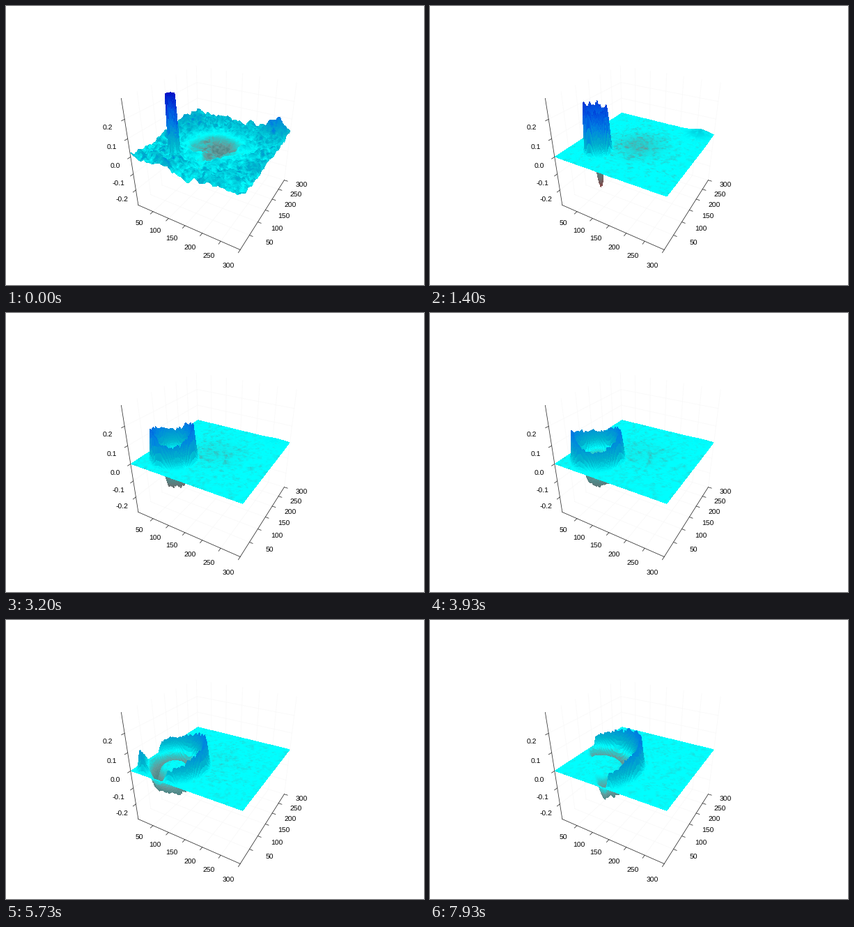
Animation of 600 by 400 pixels, one loop 8 s. Source, as a matplotlib script:

```python
import numpy as np
import matplotlib.pyplot as plt
from matplotlib.animation import FuncAnimation
from matplotlib.collections import QuadMesh
from matplotlib.colors import LinearSegmentedColormap, Normalize

W, H, DPI = 600, 400, 100
FRAMES, LOOP = 120, 8000
CELLS = 160
INSET = 0.0025   # keeps the hard-edged cells inside the plane's outline
SRC = 0.25       # wave centre, same on both axes
ZMAX = 0.3
FACING = 0.63    # direction in the plane that points right on screen

plt.rcParams["font.family"] = "Liberation Sans"
plt.rcParams["text.hinting"] = "none"
fig = plt.figure(figsize=(W / DPI, H / DPI), dpi=DPI, facecolor="white")
ax = fig.add_axes([0, 0, 1, 1])
ax.axis("off")


# ---- camera, fitted to box corners: (u, v, z) -> (x, y) ----
CORNERS = [
    ((0, 0, 0), (178.3, 216)), ((1, 0, 0), (341, 273)),
    ((1, 1, 0), (407.3, 186)), ((0, 1, 0), (275.5, 153.3)),
    ((0, 0, 1), (165.3, 133)), ((0, 0, -1), (190.4, 285.6)),
    ((1, 0, -1), (335.3, 349.8)), ((1, 1, -1), (399.5, 249.7)),
]


def fit_camera():
    rows, rhs = [], []
    for (u, v, z), (x, y) in CORNERS:
        rows.append([u, v, z, 1, 0, 0, 0, 0, -x * u, -x * v, -x * z])
        rows.append([0, 0, 0, 0, u, v, z, 1, -y * u, -y * v, -y * z])
        rhs += [x, y]
    return np.linalg.lstsq(np.array(rows, float), np.array(rhs, float), rcond=None)[0]


CAM = fit_camera()


def project(u, v, z):
    z = z / ZMAX
    depth = CAM[8] * u + CAM[9] * v + CAM[10] * z + 1
    x = (CAM[0] * u + CAM[1] * v + CAM[2] * z + CAM[3]) / depth
    y = (CAM[4] * u + CAM[5] * v + CAM[6] * z + CAM[7]) / depth
    return np.stack([x, y], axis=-1)


# ---- axes ----
def segment(a, b, color, width):
    ax.plot(*np.array([a, b]).T, color=color, lw=width * 72 / DPI, zorder=1)


def tick(at, toward, text, dx, dy):
    p = project(*at)
    d = project(*toward) - p
    segment(p, p + 5 * d / np.hypot(*d), "#333333", 0.8)
    ax.text(p[0] + dx, p[1] + dy, text, fontsize=7.5, color="black",
            ha="center", va="center_baseline")


def draw_axes():
    steps = np.arange(1, 7) / 6
    levels = np.arange(-2, 3) / 10
    grid = []
    for s in steps:
        grid += [((s, 0, -ZMAX), (s, 1, -ZMAX)), ((0, s, -ZMAX), (1, s, -ZMAX)),
                 ((0, s, -ZMAX), (0, s, ZMAX)), ((s, 1, -ZMAX), (s, 1, ZMAX))]
    for z in levels:
        grid += [((0, 0, z), (0, 1, z)), ((0, 1, z), (1, 1, z))]
    for a, b in grid:
        segment(project(*a), project(*b), "#f9f9f9", 0.8)

    path = [(0, 0, ZMAX), (0, 0, -ZMAX), (1, 0, -ZMAX), (1, 1, -ZMAX)]
    for a, b in zip(path, path[1:]):
        segment(project(*a), project(*b), "#333333", 0.8)

    for s in steps:
        label = f"{300 * s:.0f}"
        tick((s, 0, -ZMAX), (s, -0.05, -ZMAX), label, -20.5 + 4 * s, 15.5 + 7 * s)
        tick((1, s, -ZMAX), (1.05, s, -ZMAX), label, 29.5 - 5 * s, 11.5 - 4.5 * s)
    for z in levels:
        tick((0, 0, z), (0, -0.05, z), f"{z:.1f}", -22 - 10 * z, 12.8 - 5 * z)


# ---- surface grid, finer around the wave centre, ordered back to front ----
fine = np.linspace(INSET, 1 - INSET, 2000)
density = np.cumsum(1 + 3 * np.exp(-((fine - SRC) / 0.07) ** 2))
density = (density - density[0]) / (density[-1] - density[0])
knots = np.interp(np.linspace(0, 1, CELLS + 1), density, fine)
V, U = np.meshgrid(knots[::-1], knots, indexing="ij")

rng = np.random.default_rng(11)


def fractal(power, low, size=256):
    k = np.fft.fftfreq(size, 1 / size)
    freq = np.hypot(k[:, None], k[None, :])
    spectrum = np.fft.fft2(rng.standard_normal((size, size)))
    field = np.fft.ifft2(spectrum * (freq ** 2 + low ** 2) ** (-power / 2)).real
    field = (field - field.mean()) / field.std()
    return field[(V * (size - 1)).astype(int), (U * (size - 1)).astype(int)]


def mound(u, v, radius):
    return np.exp(-((U - u) ** 2 + (V - v) ** 2) / radius ** 2)


def smooth(x):
    x = np.clip(x, 0, 1)
    return x * x * (3 - 2 * x)


ROUGH = fractal(2.6, 9)
GRAIN = fractal(2.4, 18)
RAGGED = fractal(2.2, 24)
PATCH_A = fractal(1.4, 14)
PATCH_B = fractal(1.4, 14)
CENTRE = mound(0.5, 0.5, 0.22)
BUMP = mound(0.88, 0.94, 0.095)
TERRAIN = (0.009 * ROUGH - 0.045 * CENTRE + 0.03 * mound(0.05, 0.75, 0.22)
           - 0.02 * mound(0.55, 0, 0.15) + 0.012 * mound(0.6, 1, 0.25) + 0.008)
BLOTCH = 0.032 * np.abs(GRAIN) * (1 - 2.4 * CENTRE)
BORDER = smooth(U / 0.03) * smooth(V / 0.03)


def ring(u, v, t):
    r = np.hypot(u - SRC, v - SRC)
    a = np.arctan2(v - SRC, u - SRC) - FACING
    front = 0.035 + 0.0405 * t
    opened = smooth((t - 0.3) / 0.8)

    outer = 0.009 + 0.013 * min(t / 3, 1)
    crest = np.exp(-((r - front) / np.where(r > front, outer, 0.045)) ** 2)
    crest = np.where(r > front, crest, 1 + opened * (crest - 1))
    lobes = (1 + 0.2 * smooth((t - 1) / 2) * np.cos(2 * a)
             + 0.5 * smooth((t - 4) / 3) * np.cos(a))
    top = 0.08 + 0.22 * np.exp(-(t / 2.6) ** 1.5)

    dip = opened * (0.08 + 0.3 * np.exp(-t / 2))
    trough = np.exp(-((r - max(front - 0.1, 0)) / 0.045) ** 2)
    return top * lobes * crest - dip * trough


def surface(t):
    # mirrored copies are the waves thrown back by the two near edges
    wave = ring(U, V, t) - ring(-U, V, t) - ring(U, -V, t) + ring(-U, -V, t)
    wave = wave * (1 + 0.07 * smooth((t - 0.3) / 1.5) * RAGGED)
    # the near corner calms down once the ring has left it
    behind = 1 - smooth((U + V - 0.26 - 0.08 * (t - 6)) / 0.14)
    wave = wave * BORDER * (1 - behind * smooth((t - 5.7) / 0.8))

    calm = np.exp(-(wave / 0.03) ** 2)
    fade = np.exp(-t / 0.45)
    z = wave + (TERRAIN * fade + 0.08 * BUMP * np.exp(-t / 1.3)) * calm

    patch = np.clip(PATCH_A * np.cos(0.9 * t) + PATCH_B * np.sin(0.9 * t), 0, None)
    amount = 0.005 + 0.02 * (0.2 + CENTRE) * np.exp(-t / 2.5)
    tint = (amount * patch + 0.028 * CENTRE * np.exp(-t / 2.5)) * (1 - np.exp(-t / 0.5))
    return z, z + (BLOTCH * fade - tint) * calm


STOPS = [
    (-0.30, "#8c1c1c"), (-0.22, "#824040"), (-0.15, "#6a6e6e"),
    (-0.09, "#4f8888"), (-0.05, "#649a9a"), (-0.02, "#28cccc"),
    (0.00, "#00ffff"), (0.02, "#00dbe6"), (0.05, "#00b4cd"),
    (0.09, "#009bd2"), (0.13, "#0082e1"), (0.20, "#0055e1"),
    (0.30, "#0014c8"),
]
CMAP = LinearSegmentedColormap.from_list(
    "water", [((z + ZMAX) / (2 * ZMAX), c) for z, c in STOPS], N=512)
NORM = Normalize(-ZMAX, ZMAX)


def update(i):
    for old in list(ax.collections):
        old.remove()
    z, tone = surface(i * LOOP / FRAMES / 1000)
    cells = (tone[:-1, :-1] + tone[1:, :-1] + tone[:-1, 1:] + tone[1:, 1:]) / 4
    mesh = QuadMesh(project(U, V, z), antialiased=False, edgecolors="none",
                    cmap=CMAP, norm=NORM, zorder=3)
    mesh.set_array(cells)
    ax.add_collection(mesh, autolim=False)
    return (mesh,)


draw_axes()
ax.set(xlim=(0, W), ylim=(H, 0))
anim = FuncAnimation(fig, update, frames=FRAMES, interval=LOOP / FRAMES,
                     repeat=True, repeat_delay=0, blit=False)
plt.show()
```
